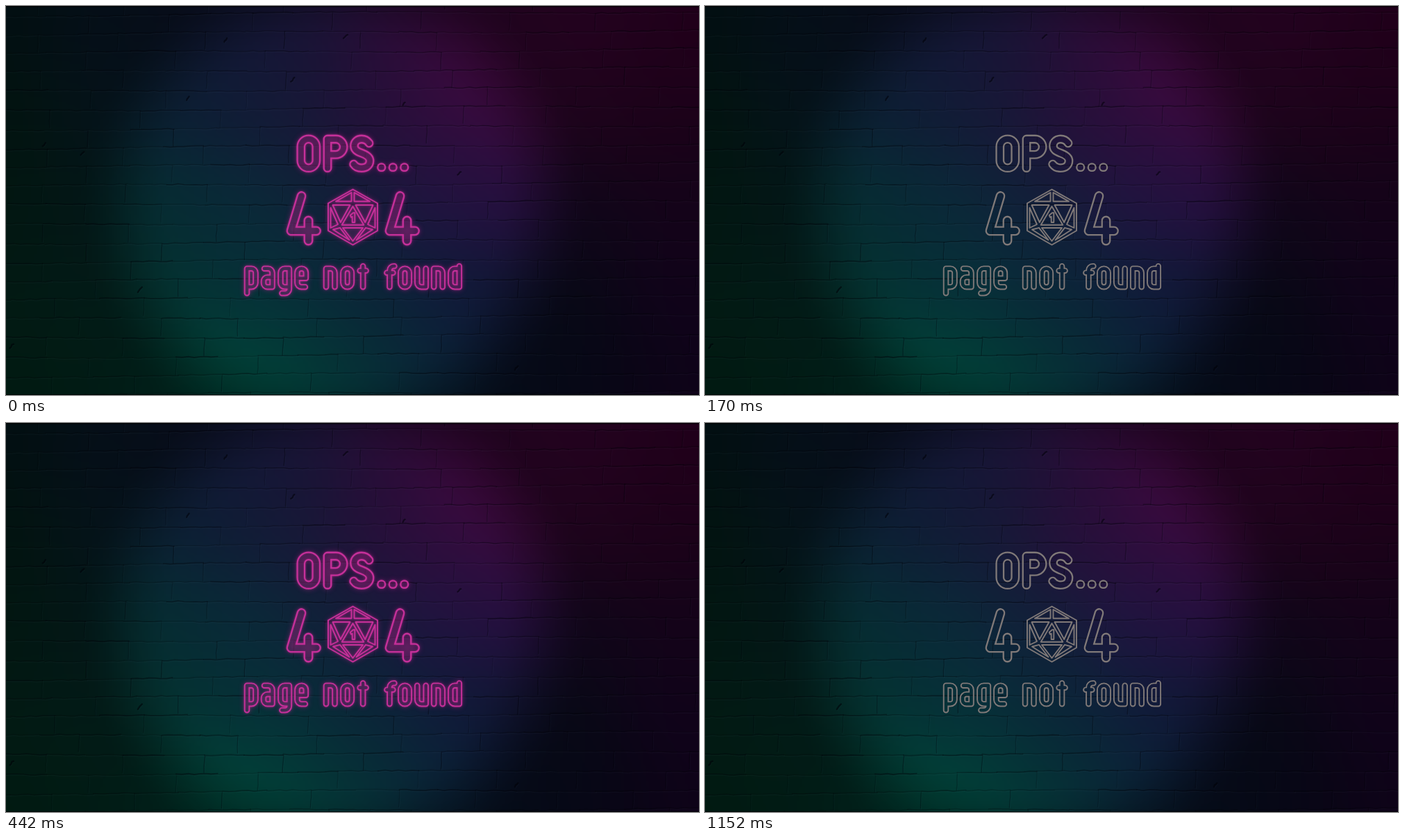
Write an HTML page with a canvas that moves like this. It is 998 px wide and 561 px high and loops after 1.58 s.

```html
<!DOCTYPE html>
<html lang="en">
<head>
<meta charset="utf-8">
<title>404</title>
<style>
html, body { margin: 0; width: 100%; height: 100%; overflow: hidden; background: #000; }
canvas, svg { position: absolute; left: 0; top: 0; width: 100%; height: 100%; display: block; }
.tube { fill: none; stroke-linecap: round; stroke-linejoin: round; }
</style>
</head>
<body>
<canvas id="wall" width="998" height="561"></canvas>
<svg viewBox="0 0 998 561" preserveAspectRatio="none" role="img" aria-label="OPS... 404 page not found">
  <defs>
    <filter id="soft" filterUnits="userSpaceOnUse" x="310" y="155" width="380" height="290"><feGaussianBlur stdDeviation="1.6"/></filter>
    <filter id="wide" filterUnits="userSpaceOnUse" x="310" y="155" width="380" height="290"><feGaussianBlur stdDeviation="4.2"/></filter>
    <g id="ops" class="tube"></g>
    <g id="num" class="tube"></g>
    <g id="page" class="tube"></g>
    <g id="die" class="tube" stroke-width="1.9"></g>
    <mask id="outline" maskUnits="userSpaceOnUse" x="310" y="155" width="380" height="290">
      <g stroke="#fff">
        <use href="#ops" stroke-width="12.8"/><use href="#num" stroke-width="13.8"/><use href="#page" stroke-width="8.5"/>
      </g>
      <g stroke="#000">
        <use href="#ops" stroke-width="8.2"/><use href="#num" stroke-width="9.2"/><use href="#page" stroke-width="4.7"/>
      </g>
      <use href="#die" stroke="#fff"/>
    </mask>
    <rect id="lines" x="310" y="155" width="380" height="290" mask="url(#outline)"/>
  </defs>
  <g id="glow">
    <g filter="url(#wide)" stroke="#c0268e" opacity=".42">
      <use href="#ops" stroke-width="12"/><use href="#num" stroke-width="13"/><use href="#page" stroke-width="8"/><use href="#die"/>
      <path id="body" fill="#c0268e" fill-opacity=".4" stroke="none"/>
    </g>
    <use href="#lines" fill="#c32b92" filter="url(#soft)" opacity=".55"/>
  </g>
  <use id="sign" href="#lines"/>
</svg>
<script>
const $ = id => document.getElementById(id);
const path = (d, x = 0, y = 0) => `<path d="${d}" transform="translate(${x} ${y})"/>`;

// Lettering: centre lines of the glass tubes
$('ops').innerHTML =
  path('M424.8 202.8a11 11 0 0 1 22 0V222.7a11 11 0 0 1-22 0Z') +
  path('M463 233.7V192H475a11.2 11.2 0 0 1 0 22.4H463') +
  path('M523 197.8C520 193.8 516.5 192 512 192c-6 0-10.5 4-10.5 9.5c0 5.5 3.5 8 11 10.8s11.5 5.6 11.5 11c0 6.3-5 10.3-12 10.3c-5 0-8.8-1.8-11.3-5.5') +
  [540.5, 557, 573.5].map(x => path('M0 0h.4', x, 232.7)).join('');

const four = 'M425.5 274L410.5 324.3H447M435.5 309.5V338.5';
$('num').innerHTML = path(four) + path(four, 142);

const glyphs = {
  p: 'M0 35.5V0h6.5a6 6 0 0 1 6 6V20.5a6 6 0 0 1-6 6H0',
  a: 'M1 0H6.5a6 6 0 0 1 6 6V26.5H5.5a5.5 5.5 0 0 1-5.5-5.5V18a5.5 5.5 0 0 1 5.5-5.5h7',
  g: 'M12.5 26.5H6a6 6 0 0 1-6-6V6a6 6 0 0 1 6-6h6.5V29.5a6 6 0 0 1-6 6H2',
  e: 'M11.5 26.5H6a6 6 0 0 1-6-6V6a6.2 6 0 0 1 12.5 0V14H0',
  n: 'M0 26.5V0h6.5a6 6 0 0 1 6 6V26.5',
  o: 'M0 6.2a6.2 6.2 0 0 1 12.5 0V20.3a6.2 6.2 0 0 1-12.5 0Z',
  t: 'M4.5-3.5V26.5M0 3H9',
  f: 'M4 26.5V2.5a6 6 0 0 1 6-6h1M0 6H9',
  u: 'M0 0V20.5a6 6 0 0 0 6 6h6.5V0',
  d: 'M12.5-3.5V26.5H6a6 6 0 0 1-6-6V6a6 6 0 0 1 6-6h6.5'
};
const word = (text, xs) => [...text].map((c, i) => path(glyphs[c], xs[i], 378.7)).join('');
$('page').innerHTML =
  word('page', [347, 371, 395.4, 419.4]) +
  word('not', [461, 485.4, 509.6]) +
  word('found', [548.4, 568.2, 592.2, 616.2, 640.3]);

// Twenty-sided die
const hex = 'M499.5 264.5L535 284.5V324L499.5 344.5L464 324V284.5Z';
const facets = 'M497.5 269V281.8H475ZM470.5 287H495.5L481.8 312ZM467.5 291L478 315L467.5 320ZM471 322.5L481 319.8L494.5 337.5Z';
$('die').innerHTML = path(hex) + path(facets) +
  `<path d="${facets}" transform="matrix(-1 0 0 1 999 0)"/>` +
  path('M499.5 289L483.7 315.8H515.3ZM485 320H514L499.5 339Z') +
  path('M495.8 301.8L500 298.3H502.3V312H498.7V303.6L497 304.8Z');
$('body').setAttribute('d', hex);

// Wall
const ctx = $('wall').getContext('2d');
let seed = 41;
const rnd = () => (seed = (seed * 16807) % 2147483647) / 2147483647;

const lights = `0 0 041e24,150 30 0b1d32,300 40 121736,430 40 181334,560 40 2b0b36,690 50 440740,830 50 4a0440,990 50 420036,
0 150 042820,150 150 0a2838,270 130 0c1d32,400 150 151a38,540 160 260f3a,660 160 350b3d,790 150 40083a,920 180 3a0434,
0 300 042e20,110 300 063030,210 300 052b30,330 280 0a2939,480 290 111f38,620 280 1f1440,720 270 270e40,840 300 1e0c32,990 290 2a0634,
0 430 043628,130 430 063a30,250 420 033231,380 400 07303a,520 410 0a2638,650 410 101a3a,770 420 10122c,990 430 220636,
0 555 023622,130 550 02382a,270 550 00483a,380 540 004036,500 540 053235,630 540 0a2438,760 540 0a1430,880 540 100c2a,990 550 200634`
  .split(',').map(s => {
    const [x, y, c] = s.trim().split(' ');
    return [+x, +y, ...[0, 2, 4].map(i => parseInt(c.substr(i, 2), 16))];
  });

// Round pool of light that dims the wall outside it
function pool(x, y) {
  const t = Math.min(1, Math.max(0, (Math.hypot(x - 472, y - 290) - 230) / 145));
  return 1 - .52 * t * t * (3 - 2 * t);
}

function paintLight() {
  const w = 250, h = 141, small = document.createElement('canvas');
  small.width = w; small.height = h;
  const c = small.getContext('2d'), img = c.createImageData(w, h);
  for (let i = 0; i < w * h; i++) {
    const x = (i % w + .5) * 998 / w, y = (Math.floor(i / w) + .5) * 561 / h;
    let sum = 0, rgb = [0, 0, 0];
    for (const [px, py, ...col] of lights) {
      const k = Math.exp(-((x - px) ** 2 + (y - py) ** 2) / 9500);
      sum += k;
      rgb = rgb.map((v, j) => v + k * col[j]);
    }
    const k = pool(x, y) / sum;
    rgb.forEach((v, j) => img.data[i * 4 + j] = v * k);
    img.data[i * 4 + 3] = 255;
  }
  c.putImageData(img, 0, 0);
  ctx.imageSmoothingQuality = 'high';
  ctx.drawImage(small, 0, 0, 998, 561);
}

function crack(x1, y1, x2, y2, alpha, width) {
  const n = Math.max(3, Math.round(Math.hypot(x2 - x1, y2 - y1) / 9));
  const pts = Array.from({ length: n + 1 }, (_, i) =>
    [x1 + (x2 - x1) * i / n + rnd() - .5, y1 + (y2 - y1) * i / n + (rnd() - .5) * 1.6]);
  const trace = (off, style, lw) => {
    ctx.beginPath();
    pts.forEach(([x, y]) => ctx.lineTo(x + off * .6, y + off));
    ctx.strokeStyle = style; ctx.lineWidth = lw; ctx.stroke();
  };
  trace(1.8, 'rgba(150,170,200,.035)', 1.2);
  trace(0, `rgba(0,0,8,${alpha})`, width);
}

function paintBricks() {
  ctx.lineJoin = ctx.lineCap = 'round';
  for (let row = 0; row < 22; row++) {
    const y = 12 + row * 27.4 - 27.4;
    const level = x => y - (x - 200) * .006 + 2 * Math.sin(x / 130 + row);
    let x = -70 + (row % 2) * 58 + rnd() * 16;
    while (x < 998) {
      const next = x + 108 + rnd() * 22, mid = (x + next) / 2;
      crack(x, level(x), mid, level(mid), .12 + rnd() * .3, 1 + rnd());
      crack(mid, level(mid), next, level(next), .12 + rnd() * .3, 1 + rnd());
      crack(next, level(next) + 1, next - 1, level(next) + 25, .1 + rnd() * .25, 1 + rnd() * .6);
      x = next;
    }
  }
  // chipped spots
  for (const [x, y, r] of [[413, 106, 4], [262, 133, 3], [193, 409, 4], [55, 200, 3], [110, 212, 3],
    [489, 44, 4], [316, 49, 3], [8, 490, 4], [573, 141, 2], [653, 241, 3], [735, 522, 3]])
    crack(x - r * .7, y + r * .8, x + r * .7, y - r * .8, .55, 2.2);
  ctx.fillStyle = 'rgba(0,0,0,.75)';
  ctx.fillRect(0, 0, 998, 1.5);
  ctx.fillRect(0, 560, 998, 1);
}

paintLight();
paintBricks();

// Flicker: two flashes, then dark
const LOOP = 1580, STEP = 170;
const glow = $('glow'), sign = $('sign');
function draw(ms) {
  const t = ms % LOOP, lit = t < STEP || (t >= 2 * STEP && t < 3 * STEP);
  glow.setAttribute('visibility', lit ? 'visible' : 'hidden');
  sign.setAttribute('fill', lit ? '#c6309a' : '#807978');
}
const start = performance.now();
function tick() {
  draw(performance.now() - start);
  requestAnimationFrame(tick);
}
draw(0);
requestAnimationFrame(tick);
</script>
</body>
</html>
```
